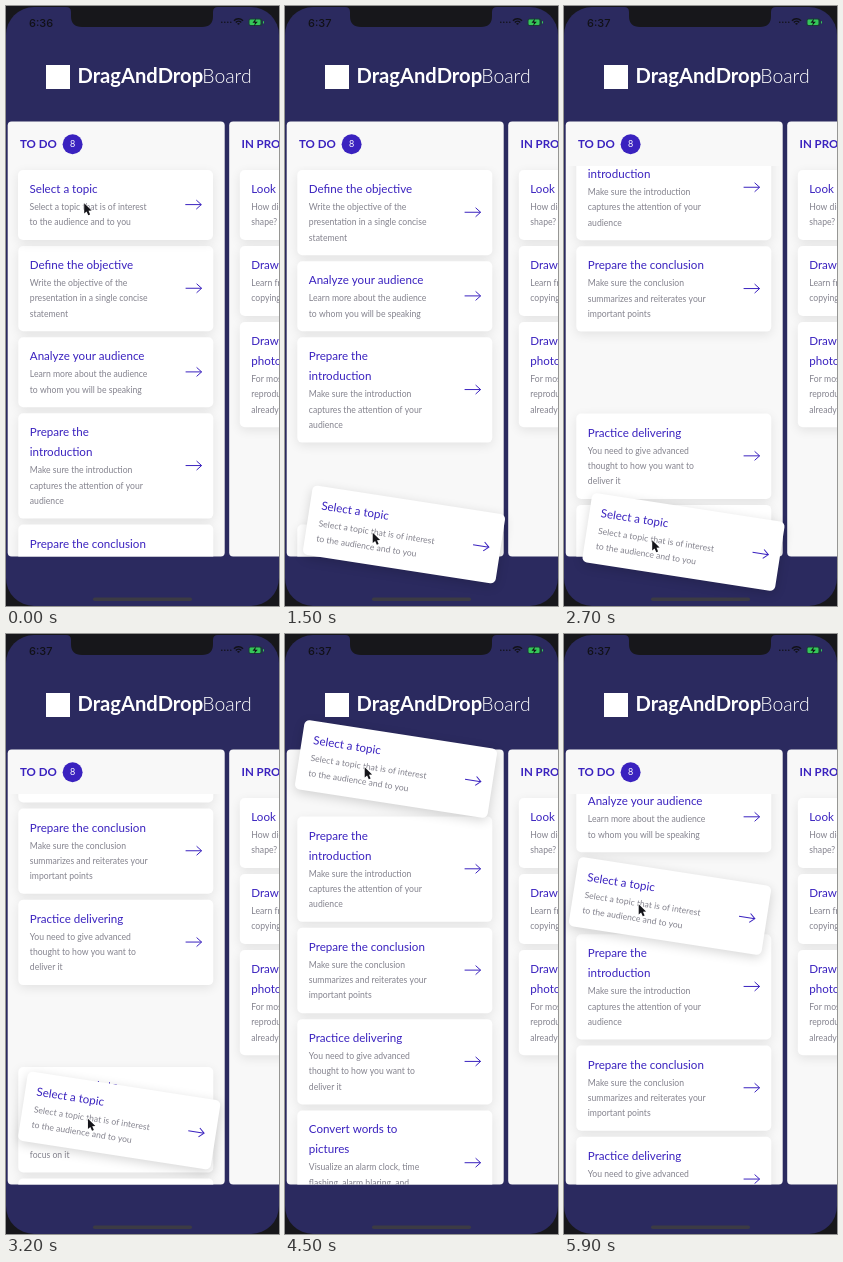
Animation, 273 px wide and 600 px high, one loop 6 s. Source, as an HTML page with a canvas:

```html
<!DOCTYPE html>
<html lang="en">
<head>
<meta charset="utf-8">
<title>Drag and drop board</title>
<style>
  html, body { margin: 0; width: 100%; height: 100%; overflow: hidden; background: #17171b; }
  canvas { display: block; width: 273px; height: 600px; }
</style>
</head>
<body>
<canvas id="stage"></canvas>
<script>
const W = 273, H = 600, LOOP = 6000, STEP = 100;
const NAVY = '#2b2a5f', VIOLET = '#3a22bf', GREY = '#84838e', DARK = '#111117', BEZEL = '#17171b';
const CARD_W = 195, GAP = 6, TITLE_LINE = 20, BODY_LINE = 15.3;
const LIST_TOP = 164, COLUMN_TOP = 115.6, COLUMN_W = 217, COLUMN_H = 435;
const TILT = 8.8 * Math.PI / 180, SCROLL_SPEED = 0.17, SWAP_TIME = 150;

const canvas = document.getElementById('stage');
const ctx = canvas.getContext('2d');
const dpr = window.devicePixelRatio || 1;
canvas.width = W * dpr;
canvas.height = H * dpr;

// A slash starts a new line.
function card(titleText, bodyText) {
  const title = titleText.split('/'), body = bodyText.split('/');
  return { title, body, height: 19.4 + title.length * TITLE_LINE + body.length * BODY_LINE };
}

const topic = card('Select a topic', 'Select a topic that is of interest/to the audience and to you');
const todo = [
  card('Define the objective', 'Write the objective of the/presentation in a single concise/statement'),
  card('Analyze your audience', 'Learn more about the audience/to whom you will be speaking'),
  card('Prepare the/introduction', 'Make sure the introduction/captures the attention of your/audience'),
  card('Prepare the conclusion', 'Make sure the conclusion/summarizes and reiterates your/important points'),
  card('Practice delivering', 'You need to give advanced/thought to how you want to/deliver it'),
  card('Convert words to/pictures', 'Visualize an alarm clock, time/flashing, alarm blaring, and/focus on it'),
  card('', '')
];
const inProgress = [
  card('Look', 'How did/shape?'),
  card('Draw', 'Learn from/copying'),
  card('Draw/photographs', 'For most/reproduce/already')
];

// Centre of the dragged card: time, x, y.
const dragPath = [
  [200, 109.5, 199], [1450, 119, 528], [1800, 119.5, 536], [2900, 119.5, 536], [3500, 107, 437],
  [3900, 109, 153], [4500, 111, 135], [5000, 109, 143], [5300, 105, 212], [5900, 106, 272]
];
// Moments when the empty slot moves one place down or up the list.
const swapsDown = [500, 1000, 1200, 1700, 3000, 5600];
const swapsUp = [3500, 3700, 4300, 4900];

const clamp = (v, lo = 0, hi = 1) => Math.min(hi, Math.max(lo, v));
const smooth = u => u * u * (3 - 2 * u);
const ramp = (t, from, to) => smooth(clamp((t - from) / (to - from)));
const countSwaps = (times, t) => times.reduce((sum, at) => sum + ramp(t, at, at + SWAP_TIME), 0);
const slotAt = t => countSwaps(swapsDown, t) - countSwaps(swapsUp, t);
const scrollAt = t => SCROLL_SPEED * (clamp(t - 1510, 0, 1577) - clamp(t - 4245, 0, 947));

function dragAt(t) {
  const i = clamp(dragPath.findLastIndex(key => key[0] <= t), 0, dragPath.length - 2);
  const [t0, x0, y0] = dragPath[i], [t1, x1, y1] = dragPath[i + 1];
  const u = ramp(t, t0, t1);
  return [x0 + (x1 - x0) * u, y0 + (y1 - y0) * u];
}

function text(str, x, y, font, color) {
  ctx.font = font + ', sans-serif';
  ctx.fillStyle = color;
  ctx.fillText(str, x, y);
}

function box(x, y, w, h, r, color) {
  ctx.beginPath();
  ctx.roundRect(x, y, w, h, r);
  ctx.fillStyle = color;
  ctx.fill();
}

function shape(path, color) {
  ctx.fillStyle = color;
  ctx.fill(new Path2D(path));
}

function line(path, color, width) {
  ctx.strokeStyle = color;
  ctx.lineWidth = width;
  ctx.stroke(new Path2D(path));
}

function drawCard({ title, body, height }, x, y, lifted = false) {
  ctx.save();
  ctx.shadowColor = lifted ? 'rgba(0,0,0,.16)' : 'rgba(0,0,0,.09)';
  ctx.shadowBlur = 11 * dpr;
  ctx.shadowOffsetY = 3 * dpr;
  box(x, y, CARD_W, height, 5, '#fff');
  ctx.restore();
  const left = x + 11.5, bodyTop = y + 20 + title.length * TITLE_LINE;
  title.forEach((str, i) => text(str, left, y + 23 + i * TITLE_LINE, '11.6px Lato', VIOLET));
  body.forEach((str, i) => text(str, left, bodyTop + i * BODY_LINE, '8.65px Lato', GREY));
  line(`M${x + 167.3} ${y + height / 2 - 0.4}h16m-5 -4.5l5 4.5l-5 4.5`, VIOLET, 1);
}

function drawStack(cards, x, y, shiftOf = () => 0) {
  cards.forEach((item, i) => {
    drawCard(item, x, y + shiftOf(i));
    y += item.height + GAP;
  });
}

function drawStatusBar(t) {
  text(t < 700 ? '6:36' : '6:37', 23, 20.5, '500 11px Inter', DARK);
  for (let i = 0; i < 4; i++) box(215 + i * 3, 15.5, 1.6, 1.6, 0.8, DARK);
  ctx.strokeStyle = DARK;
  ctx.lineWidth = 1.5;
  for (let r = 1.2; r < 7; r += 2.5) {
    ctx.beginPath();
    ctx.arc(232.5, 19, r, -Math.PI * 0.76, -Math.PI * 0.24);
    ctx.stroke();
  }
  box(242.5, 12.5, 14, 7.5, 2, '#1b3a3a');
  box(243.5, 13.5, 11, 5.5, 1.2, '#35c759');
  box(257, 15, 1, 2.5, 0.5, '#35c759');
  shape('M250 12.5l-3.5 4.3h2.5l-1 3.2l3.8 -4.3h-2.6z', DARK);
}

function drawScreen(t) {
  ctx.fillStyle = BEZEL;
  ctx.fillRect(0, 0, W, H);
  box(0, 1, W, H - 1, 28, NAVY);
  shape('M60 0v1q5 0 5 5v4q0 11 11 11h120q11 0 11 -11v-4q0 -5 5 -5v-1z', BEZEL);
  drawStatusBar(t);
  box(40, 59, 24, 24, 0, '#fff');
  text('DragAndDrop', 71.5, 77, 'bold 20.2px Lato', '#fff');
  text('Board', 196.3, 77, '300 19.4px Lato', '#fff');
  box(87, 591.5, 99, 3.5, 1.75, '#3c3b44');
}

function drawColumn(x, title) {
  box(x, COLUMN_TOP, COLUMN_W, COLUMN_H, 4, '#f8f8f8');
  text(title, x + 12.3, 142, 'bold 11.5px Lato', VIOLET);
}

function drawBoard(slot, scroll) {
  drawColumn(1.7, 'TO DO');
  box(56.6, 128.2, 20, 20, 10, VIOLET);
  text('8', 64, 141.2, '9px Lato', '#fff');

  ctx.save();
  ctx.beginPath();
  ctx.rect(0, 160, 219, 390.5);
  ctx.clip();
  const shiftOf = i => clamp(i - slot + 1) * (topic.height + GAP);
  drawStack(todo, 12.3, LIST_TOP - scroll, shiftOf);
  ctx.restore();

  drawColumn(223.2, 'IN PROGRESS');
  drawStack(inProgress, 233.8, LIST_TOP);
}

function drawPointer(x, y) {
  const outline = `M${x} ${y}v10.4l2.4 -2.1l1.7 3.8l1.8 -.8l-1.6 -3.7l3.1 -.2z`;
  line(outline, '#fff', 1.2);
  shape(outline, '#15151a');
}

function draw(t) {
  const [x, y] = dragAt(t);
  const tilt = TILT * ramp(t, 200, 350);

  ctx.setTransform(dpr, 0, 0, dpr, 0, 0);
  drawScreen(t);
  drawBoard(slotAt(t), scrollAt(t));

  ctx.save();
  ctx.translate(x, y);
  ctx.rotate(tilt);
  drawCard(topic, -CARD_W / 2, -topic.height / 2, tilt > 0);
  ctx.restore();
  drawPointer(x - 31.3, y - 1.8);
}

const start = performance.now();
function tick() {
  const t = (performance.now() - start) % LOOP;
  draw(Math.floor(t / STEP) * STEP);
  requestAnimationFrame(tick);
}
tick();
</script>
</body>
</html>
```
